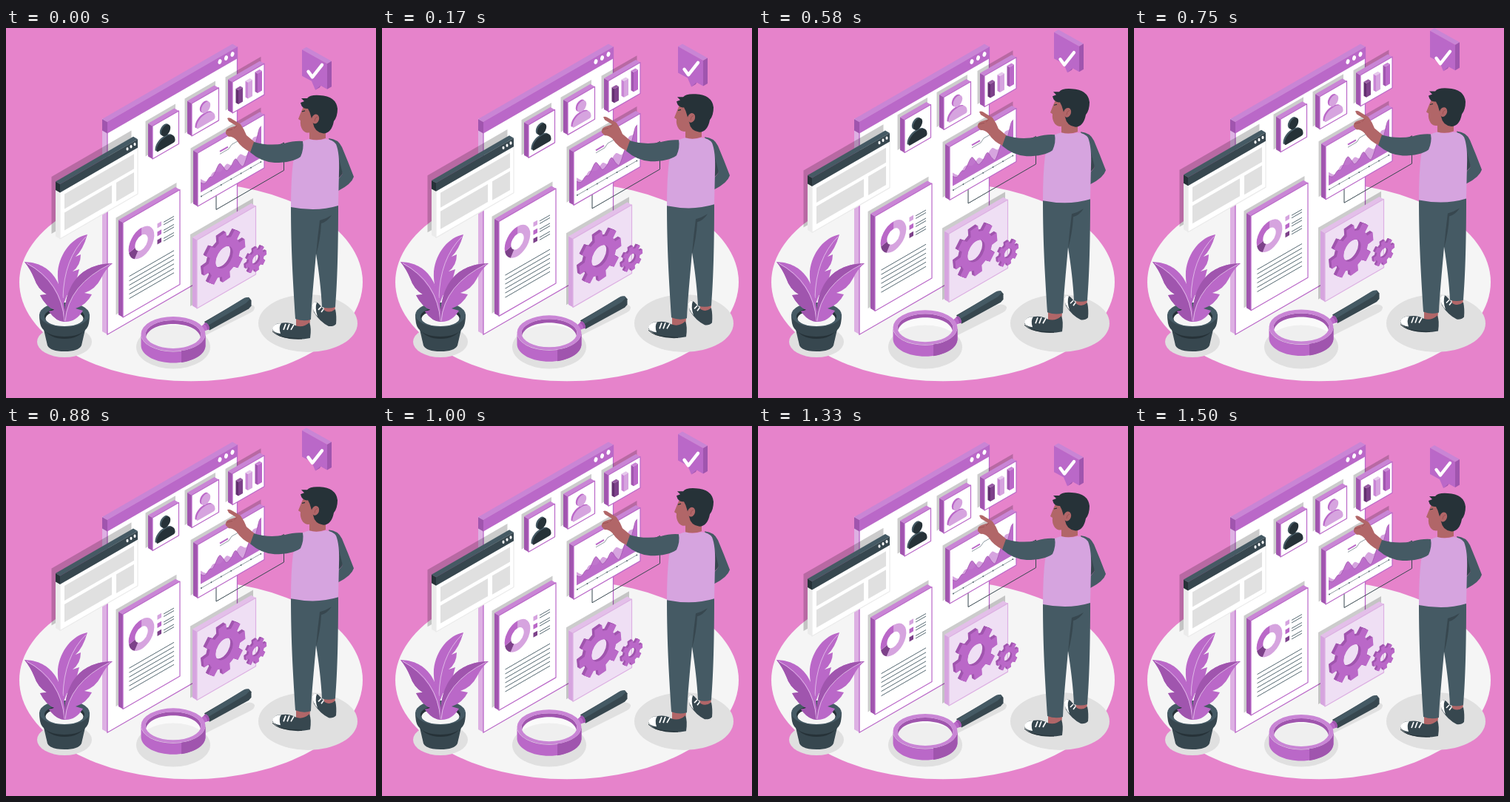
An HTML page for the animation above (1540 ms loop, 500 by 500 pixels).

```html
<!DOCTYPE html>
<html lang="en">
<head>
<meta charset="utf-8">
<title>Dashboard</title>
<style>
html, body { margin: 0; width: 100%; height: 100%; overflow: hidden; background: #e683cb; }
svg { display: block; width: 100%; height: 100%; }
</style>
</head>
<body>
<svg id="stage" viewBox="0 0 500 500"></svg>
<script>
const K = 0.577; // slope of the isometric x axis
const C = {
  mid: '#ba68c8', dark: '#a055ae', deep: '#7d418a', top: '#c985d5', pale: '#d6a4df', faint: '#efdff4',
  slate: '#455a64', slate2: '#37474f', ink: '#263238', skin: '#b16668', skin2: '#9a5153',
  grey: '#e0e0e0', floor: '#f5f5f5', white: '#fff'
};

const path = (d, fill, more = '') => `<path d="${d}" fill="${fill}" ${more}/>`;
const line = (d, color, w = 1, more = '') =>
  `<path d="${d}" fill="none" stroke="${color}" stroke-width="${w}" ${more}/>`;
const oval = (x, y, rx, ry, fill, more = '') =>
  `<ellipse cx="${x}" cy="${y}" rx="${rx}" ry="${ry}" fill="${fill}" ${more}/>`;
const poly = (pts, fill, more = '') => `<polygon points="${pts}" fill="${fill}" ${more}/>`;
const group = (id, body) => `<g id="${id}">${body}</g>`;
const iso = (x, y, body) => `<g transform="matrix(.866 -.5 0 1 ${x} ${y})">${body}</g>`;

// upright parallelogram, (x, y) is its top left corner
const slab = (x, y, w, h, fill, more) =>
  poly([x, y, x + w, y - K * w, x + w, y - K * w + h, x, y + h], fill, more);
const shade = (x, y, w, h) => slab(x, y, w, h, '#000', 'opacity=".2"');

function box(x, y, w, h, d, [top, side, front], edge) {
  const e = d * K, r = x + w, ry = y - K * w;
  return poly([x - d, y - e, x, y, x, y + h, x - d, y + h - e], side) +
    poly([x - d, y - e, x, y, r, ry, r - d, ry - e], top) +
    slab(x, y, w, h, front, edge ? `stroke="${edge}" stroke-width="1.2" stroke-linejoin="round"` : '');
}

const card = (x, y, w, h) => shade(x - 9.5, y - 6.5, w + 5, h + 3) +
  box(x, y, w, h, 6, [C.top, C.dark, C.white], C.mid);

// smooth curve through the given points
function curve(p) {
  let d = `M${p[0]}`;
  for (let i = 0; i < p.length - 1; i++) {
    const a = p[i], b = p[i + 1], before = p[i - 1] || a, after = p[i + 2] || b;
    const at = (q, u, v) => [0, 1].map(k => (q[k] + (u[k] - v[k]) / 6).toFixed(1));
    d += `C${at(a, b, before)} ${at(b, a, after)} ${b}`;
  }
  return d;
}

function gear(x, y, R, hole, depth) {
  const step = Math.PI / 4, pts = [];
  for (let i = 0; i < 8; i++)
    for (const [a, r] of [[-0.25, 0.75], [-0.18, 1], [0.18, 1], [0.25, 0.75]]) {
      const t = i * step - 0.1 + a;
      pts.push(`${(R * r * Math.cos(t)).toFixed(1)} ${(R * r * Math.sin(t)).toFixed(1)}`);
    }
  const d = `M${pts.join('L')}ZM${hole} 0A${hole} ${hole} 0 1 0 ${-hole} 0A${hole} ${hole} 0 1 0 ${hole} 0Z`;
  let out = '';
  for (let i = depth; i >= 0; i -= 0.5)
    out += iso(x - i, y - i * K, path(d, i ? C.dark : C.mid, 'fill-rule="evenodd"'));
  return out;
}

function ring(a, b, color) {
  const p = t => `${(15 * Math.sin(t)).toFixed(2)} ${(-15 * Math.cos(t)).toFixed(2)}`;
  return line(`M${p(a)}A15 15 0 ${b - a > Math.PI ? 1 : 0} 1 ${p(b)}`, color, 10);
}

function user(x, y, color, side) {
  const shape = c => oval(0, -14.5, 7.2, 7.2, c) + path('M-14.5 6C-14.5 -2 -8 -6 0 -6C8 -6 14.5 -2 14.5 6Q14 8 12 8H-12Q-14 8 -14.5 6Z', c);
  return iso(x - 2, y - 1.2, shape(side)) + iso(x, y, shape(color));
}

function board() {
  const dots = [[289, 45.5], [297.5, 40.5], [306, 35.5]];
  return poly('130,122 137,127 137,414 130,410', '#ddb0e3') +
    slab(137, 127.5, 175.5, 286.7, C.white, `stroke="${C.mid}" stroke-width="1.3"`) +
    box(137, 127, 176, 15.5, 7, [C.top, C.dark, C.mid]) +
    dots.map(([x, y]) => oval(x, y, 2.4, 3.4, C.white, `transform="rotate(15 ${x} ${y})"`)).join('');
}

function browser() {
  const dots = [[164, 163.5], [169, 160.3], [174, 157.2]];
  return shade(61.5, 201, 108, 77) +
    box(73, 221, 105, 64, 6, [C.white, '#ebebeb', C.white], '#ebebeb') +
    box(73, 211, 105, 11.5, 6, [C.slate, C.ink, C.slate2]) +
    slab(79, 224.5, 94, 20, C.grey) + slab(79, 249.5, 64, 24, C.grey) + slab(149, 209, 24, 25.5, C.grey) +
    dots.map(([x, y]) => oval(x, y, 1.5, 2.2, C.white)).join('');
}

function report() {
  let out = card(158, 263, 77, 128) +
    iso(183, 290, ring(0, 3.7, C.pale) + ring(3.7, 4.5, C.deep) + ring(4.5, 6.29, C.mid));
  [C.pale, C.mid, C.deep].forEach((c, i) => {
    const y = 264.5 + i * 11;
    out += slab(204.5, y, 5.5, 6, c) +
      line(`M213 ${y - 2}l14 -8M213 ${y + 1.5}l14 -8`, C.slate, 0.9);
  });
  for (let i = 0; i < 6; i++) out += line(`M166.5 ${335.7 + i * 6}l60.5 -34.9`, C.slate, 0.9);
  return out;
}

function bars() {
  const bar = (x, y, h, f, t, s) => box(x, y, 6, h, 3.5, [t, s, f]);
  return card(306, 73, 43, 42) +
    bar(314, 84, 19, C.deep, '#975aa3', '#632f70') +
    bar(327, 73.5, 22, C.pale, '#e6c8ec', C.top) +
    bar(340, 61.5, 26.5, C.mid, C.top, C.dark);
}

function chart() {
  const hill = [[263, 209], [269, 210], [275, 202], [280, 200], [288, 184], [293, 187], [298, 193], [304, 187],
    [310, 177], [316, 184], [321, 186], [328, 167], [333, 156], [337, 156], [342, 137], [345, 133]];
  const back = [[263, 204], [272, 207], [280, 195], [290, 194], [298, 184], [306, 185], [316, 171],
    [325, 172], [333, 150], [340, 145], [345, 131]];
  const foot = 'L345 175L263 222Z';
  let ticks = '';
  for (let i = 0; i < 7; i++) ticks += oval(264 + i * 13.4, 227.5 - i * 13.4 * K, 0.8, 1, C.slate);
  return card(259, 169, 90, 72) +
    path(curve(back) + foot, C.pale) + path(curve(hill) + foot, C.mid, 'opacity=".9"') +
    line(curve(hill), C.dark, 0.8) +
    line('M263 228L345 180.7', C.slate, 0.6) + ticks +
    line('M289 167l11 -6.4', C.mid, 2) +
    line('M289 170.5l12 -7l4 -6l8 -4.5', C.slate, 0.6);
}

function gears() {
  return shade(249, 279, 85, 97) +
    box(258, 286.5, 79.5, 92.5, 6, ['#e3bfe9', C.pale, C.faint], '#ddb0e3') +
    gear(295, 310, 33, 13.5, 3.5) + gear(338, 313, 16.5, 6, 2.5);
}

function lens() {
  return poly('268,397 322,365.5 328,363.8 331.5,368 331.5,375.5 328,379.5 275,408.5', C.slate2) +
    path('M270 397L320 366Q326 362 330 366L324 372L273 402Z', C.slate) +
    path('M264 403L270 398Q275 401 275 407L267 410Z', C.mid) +
    path('M270 398Q275 401 275 407L272 408Q272 402 267 400Z', C.dark) +
    path('M189 418C194 394 258 394 263 418C258 439 194 439 189 418Z', C.white, 'opacity=".5"') +
    path('M182.5 414V430C184 443 203 452.5 226 452.5C249 452.5 268 443 269.5 430V414A43.5 23.5 0 0 1 182.5 414Z', C.mid) +
    path('M237 436.3V452C256 449 268.5 441 269.5 430V414A43.5 23.5 0 0 1 237 436.3Z', C.dark) +
    path('M188.5 414a37.5 19 0 1 1 75 0L263 418C258 394 194 394 189 418Z', C.dark) +
    path('M182.5 413.5a43.5 23.5 0 1 0 87 0a43.5 23.5 0 1 0 -87 0ZM188.5 414a37.5 19 0 1 1 75 0a37.5 19 0 1 1 -75 0Z',
      C.top, 'fill-rule="evenodd"');
}

function plant() {
  const rib = d => line(d, '#e3bfe9', 0.9);
  return oval(79, 424, 37, 21, C.grey) +
    path('M50 403L56 429Q60 437 79 437Q98 437 102 429L108 403Z', C.slate2) +
    path('M51 407Q60 420 79 420Q98 420 107 407L106 403H52Z', C.ink) +
    path('M45 387Q45 401 49 406Q58 417 79 417Q100 417 109 406Q113 401 113 387Z', C.slate2) +
    oval(79, 387.5, 34, 16.5, C.slate) + oval(79, 390, 27, 12.5, C.ink) + oval(79, 392.5, 25.5, 10.5, C.floor) +
    path('M110 279C90 283 73 303 70 329C69 345 74 360 77 375L82 362Q94 350 99 326L90 329Q101 321 101 306L94 309Q104 300 110 279Z', C.mid) +
    rib('M108 282Q78 312 77 365') +
    path('M25 316C56 317 80 337 80 397Q68 397 58 383L66 381Q54 377 46 361L55 360Q43 353 38 338Q33 326 25 316Z', C.mid) +
    path('M25 316Q33 326 38 338Q43 353 55 360L46 361Q54 377 66 381L58 383Q68 397 79 397Q75 345 25 316Z', C.dark) +
    rib('M28 318Q75 343 79 396') +
    path('M144 318C108 319 78 338 79 397Q94 398 104 382L94 379Q109 374 116 360L106 358Q121 353 128 339Q135 325 144 318Z', C.mid) +
    path('M144 318C108 319 78 338 79 397Q84 346 144 318Z', C.dark) +
    rib('M141 319Q84 347 80 396');
}

function man() {
  const shoes =
    path('M429 375L445 374L444 386L431 386Z', C.skin) +
    path('M414 374Q417 368 422 372L431 382Q438 386 445 380Q447 389 446 400Q442 404 436 403Q424 397 416 384Z', C.slate2) +
    path('M414 374Q416 369 420 371Q417 378 421 390Q414 382 414 374Z', C.white) +
    line('M422 381l4 -4M426 384l3 -4', C.white, 1.6) +
    path('M392 392L411 394L410 405L392 405Z', C.skin) +
    path('M360 408Q361 399 371 399Q383 397 391 402Q401 406 410 398Q413 405 411 419Q398 422 383 420Q366 417 360 408Z', C.slate2) +
    path('M360 407Q361 399 372 399Q368 404 371 413Q362 412 360 407Z', C.white) +
    line('M360 410Q368 418 384 419L400 420', C.ink, 1) +
    line('M375 408l3 -8M380 408l3 -8M385 408l4 -7', C.white, 1.7);
  const legs =
    path('M385 240L449 238C449 290 448 340 445 377Q436 380 427 377C426 355 423 330 419 305C416 340 413 370 412 394Q402 397 391 393C388 345 385 300 385 240Z', C.slate) +
    path('M440 253Q432 258 424 260Q421 282 419 307Q425 285 426 264Q434 262 440 253Z', C.slate2);
  const backArm =
    path('M436 149Q449 150 454 161Q462 180 470 201Q467 211 449 220L446 208L455 197L443 172Z', C.slate) +
    path('M444 172L450 177L455 197L447 206Z', C.slate2);
  const torso = path('M399 154Q405 151 410 150Q420 153 432 150Q442 151 446 157Q451 169 450 195L449 240Q420 249 385 242Q385 205 388 181Z', C.pale);
  const head =
    path('M410 136L432 134L432 149Q421 153 410 150Z', C.skin) +
    path('M402 106Q398 115 395 123L398 125Q397 132 401 138Q406 144 415 140L423 130L420 105Z', C.skin) +
    path('M398 101L403 99L399 95L407 95Q411 90 424 91Q446 92 448 109Q448 120 443 126Q440 142 429 142.5Q417 141 415 129L412 119Q411 114 408 109Q400 110 398 101Z', C.ink) +
    oval(418, 123, 5, 6.5, C.skin, 'transform="rotate(18 418 123)"') +
    line('M417 126Q417 121 421 120', C.skin2, 1) +
    line('M400 113l4 -1', C.ink, 1.2);
  const arm =
    path('M299 122Q302 120 307 124L317 130Q322 137 325 145L337 155L331 168Q319 163 311 151Q305 146 301 147L297 143Q296 137 302 135L311 132L301 126Z', C.skin) +
    line('M298 139L306 137M312 132L308 136', C.skin2, 0.9) +
    path('M335 154Q355 160 376 156Q390 152 401 153Q403 163 398 174Q387 182 363 182Q345 181 330 168Z', C.slate);
  return shoes + legs + backArm + torso + head + arm;
}

const bubble =
  poly('400,29.5 406,26 440,45 434,48.5', C.top) +
  poly('434,48.5 440,45 440,79.5 434,83', C.dark) +
  poly('418,84 424,80.5 426,77 424,77', C.dark) +
  path('M400 29.5L434 48.5V83L425 78L418 84L413 72L400 65Z', C.mid);
const tick = line('M408.5 59L414 66.5L427 50', C.white, 4.4, 'stroke-linecap="round" stroke-linejoin="round"');
const link = line('M284 222V245.5L375.5 192.5V155L349 170.3', C.slate2, 1);

const stage = document.getElementById('stage');
stage.innerHTML =
  '<rect width="500" height="500" fill="#e683cb"/>' + oval(250, 343.3, 232, 134, C.floor) +
  oval(408, 399, 67, 39, C.grey) + oval(226, 431, 50, 29.5, C.grey) +
  path('M262 405L322 375Q332 371 336 377Q337 382 328 386L270 415Z', C.grey) +
  board() +
  group('panels', browser() + report() + card(198, 132.5, 35.5, 44.5) + user(216, 153, C.ink, C.slate) +
    card(251, 102, 36.5, 44) + user(270, 122, C.pale, C.mid) + bars() + link + chart() + gears()) +
  plant() + group('lens', lens()) + group('man', man()) + group('bubble', bubble) + group('tick', tick);

// travel upwards in pixels
const rise = { panels: 9.3, lens: 9.5, man: 9.5, bubble: 25.8, tick: 18.3 };
const parts = Object.entries(rise).map(([id, h]) => [document.getElementById(id), h]);
const LOOP = 1540, STEPS = 37;

function draw(ms) {
  const t = Math.floor((ms + 5) / LOOP * STEPS) / STEPS;
  const up = (1 - Math.cos(2 * Math.PI * (t + 45 / LOOP))) / 2;
  for (const [el, h] of parts) el.setAttribute('transform', `translate(0 ${(-h * up).toFixed(2)})`);
}

const start = performance.now();
function play() {
  draw(performance.now() - start);
  requestAnimationFrame(play);
}
play();
</script>
</body>
</html>
```
